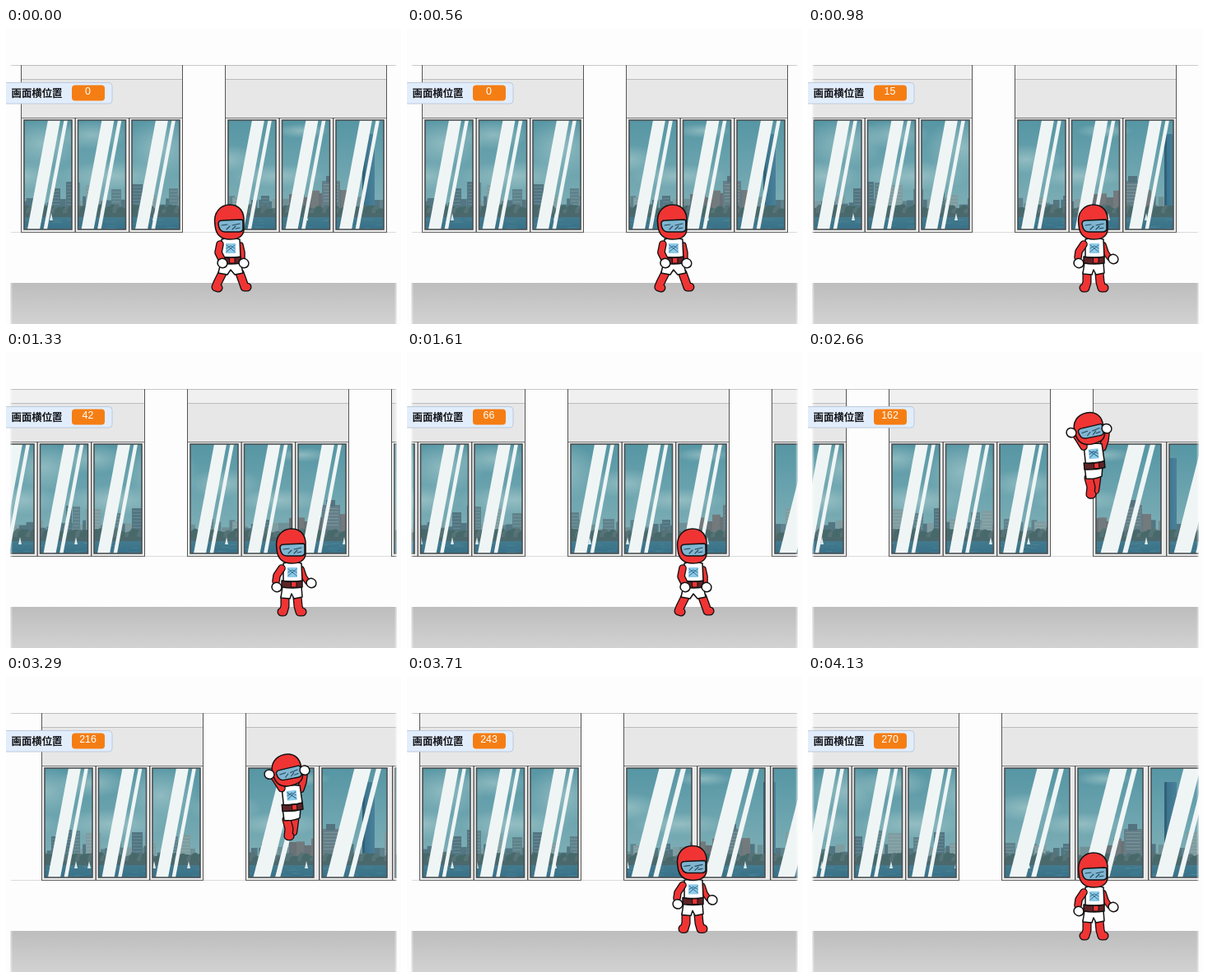
Animation, 480 px wide and 360 px high, one loop 4200 ms. Source, as an HTML page with a canvas:

```html
<!DOCTYPE html>
<html lang="ja">
<head>
<meta charset="utf-8">
<style>
html, body { margin: 0; width: 100%; height: 100%; overflow: hidden; background: #fdfdfd; }
canvas { display: block; }
</style>
</head>
<body>
<canvas id="stage" width="480" height="360"></canvas>
<script>
const W = 480, H = 360, LOOP = 4200, STEP = 70;
const RED = '#f03434', WHITE = '#fff', INK = '#111';
const ctx = document.getElementById('stage').getContext('2d');

function box(c, fill, x, y, w, h) {
  c.fillStyle = fill;
  c.fillRect(x, y, w, h);
}

function poly(c, fill, pts) {
  c.beginPath();
  pts.forEach(p => c.lineTo(p[0], p[1]));
  c.closePath();
  c.fillStyle = fill;
  c.fill();
}

function fade(c, x0, y0, x1, y1, ...colors) {
  const g = c.createLinearGradient(x0, y0, x1, y1);
  colors.forEach((col, i) => g.addColorStop(i / (colors.length - 1), col));
  return g;
}

// The city behind the windows stays still while the wall slides past.
function makeCity() {
  const cv = document.createElement('canvas');
  cv.width = W;
  cv.height = H;
  const c = cv.getContext('2d');
  let seed = 7;
  const rnd = () => (seed = seed * 16807 % 2147483647) / 2147483647;

  box(c, fade(c, 0, 110, 0, 225, '#5595a3', '#6aa3ae', '#80afb6'), 0, 105, W, 145);
  for (const [x, y, rx, ry] of [
    [45, 140, 50, 30], [105, 130, 44, 18], [188, 145, 46, 36], [130, 180, 70, 18],
    [265, 160, 46, 18], [330, 180, 60, 14], [360, 125, 35, 9], [20, 180, 44, 18]]) {
    c.save();
    c.translate(x, y);
    c.scale(rx, ry);
    const g = c.createRadialGradient(0, 0, 0, 0, 0, 1);
    g.addColorStop(0, 'rgba(168,202,204,.65)');
    g.addColorStop(1, 'rgba(168,202,204,0)');
    box(c, g, -1, -1, 2, 2);
    c.restore();
  }

  const greys = ['#6e9097', '#5f838c', '#7f9da1', '#527682'];
  for (let x = 0; x < W; x += 5 + rnd() * 6)
    box(c, greys[rnd() * 4 | 0], x, 204 + rnd() * 12, 6 + rnd() * 7, 30);
  for (const [x, y, w, i] of [
    [55, 195, 11, 3], [73, 187, 7, 3], [81, 188, 9, 1], [97, 191, 18, 2], [128, 196, 12, 1],
    [153, 190, 13, 3], [172, 203, 10, 2], [198, 195, 11, 1], [211, 193, 13, 2],
    [238, 203, 14, 1], [275, 206, 14, 2], [310, 204, 10, 3], [460, 190, 14, 2]]) {
    box(c, greys[i], x, y, w, 32);
    for (let yy = y + 3; yy < 220; yy += 4) box(c, 'rgba(190,210,210,.2)', x + 1, yy, w - 2, 1);
  }
  for (let x = 344; x < 412; x += 9)
    box(c, x % 2 ? '#737a7d' : '#687277', x, 197 + rnd() * 9, 10, 32);
  box(c, '#647f88', 384, 186, 22, 40);
  box(c, '#53737f', 389, 180, 11, 8);
  for (let y = 190; y < 212; y += 4) box(c, '#7d959b', 386, y, 18, 1);
  box(c, fade(c, 433, 0, 448, 0, '#38708a', '#4a819a'), 433, 129, 15, 90);
  box(c, '#316078', 433, 129, 3, 90);

  for (let x = 0; x < W; x += 5) {
    c.fillStyle = x % 3 ? '#47696a' : '#577377';
    c.beginPath();
    c.ellipse(x, 224, 6, 4 + rnd() * 6, 0, 0, 7);
    c.fill();
  }
  box(c, '#4b686d', 0, 225, W, 6);
  box(c, fade(c, 0, 230, 0, 247, '#437a8d', '#356f88'), 0, 230, W, 18);
  for (let i = 0; i < 70; i++)
    box(c, 'rgba(105,155,170,.35)', rnd() * W, 232 + rnd() * 13, 5 + rnd() * 10, .7);
  for (const x of [17, 55, 85, 101, 180, 222, 268, 365, 411])
    poly(c, '#dce8e9', [[x, 225], [x + 2, 234], [x - 2, 234]]);
  return cv;
}
const city = makeCity();

function pane(x, w) {
  const y = 112, h = 133, k = w / 58;
  box(ctx, '#f2f2f2', x - 2, 110, w + 4, 137);
  ctx.save();
  ctx.beginPath();
  ctx.rect(x, y, w, h);
  ctx.clip();
  ctx.drawImage(city, 0, 0);
  const bar = (a, b, c, d) => poly(ctx, '#eff5f5',
    [[x + a * k, y], [x + b * k, y], [x + d * k, y + h], [x + c * k, y + h]]);
  bar(29, 44, 4, 19);
  bar(48.5, 53, 23.5, 28);
  ctx.restore();
  ctx.lineWidth = 1.6;
  ctx.strokeStyle = '#4a5052';
  ctx.strokeRect(x, y, w, h);
}

function facade(x, w, pitch, glass) {
  box(ctx, '#f0f0f0', x, 45, w, 18);
  box(ctx, '#e7e7e7', x, 62, w, 48);
  box(ctx, '#e9e9e9', x, 109, w, 139);
  box(ctx, '#bcbcbc', x, 45, w, 1);
  box(ctx, '#bcbcbc', x, 62, w, 1);
  box(ctx, '#777', x, 109, w, 1);
  for (let i = 0; i < 3; i++) {
    if (i) box(ctx, '#555', x + i * pitch, 109, 1.4, 139);
    pane(x + 4 + i * pitch, glass);
  }
  box(ctx, '#666', x, 248, w, 1);
  box(ctx, '#555', x, 45, 1, 203);
  box(ctx, '#555', x + w - 1, 45, 1, 203);
}

function scene(shift) {
  box(ctx, '#fdfdfd', 0, 0, W, H);
  box(ctx, '#c9c9c9', 5, 45, 470, 1);
  box(ctx, '#dadada', 5, 248, 470, 1);
  facade(18 - shift, 197, 65.5, 58);
  facade(266 - shift, 197, 65.5, 58);
  facade(514 - shift, 268, 89, 79);
  box(ctx, fade(ctx, 0, 310, 0, 360, '#bdbdbd', '#d2d2d2'), 0, 310, W, 50);
  box(ctx, '#fdfdfd', 0, 0, 5, H);
  box(ctx, '#fdfdfd', 475, 0, 5, H);
  box(ctx, fade(ctx, 5, 0, 8, 0, 'rgba(253,253,253,.7)', 'rgba(253,253,253,0)'), 5, 0, 3, H);
  box(ctx, fade(ctx, 472, 0, 475, 0, 'rgba(253,253,253,0)', 'rgba(253,253,253,.7)'), 472, 0, 3, H);
}

function shape(path, fill, line = 1.5) {
  const p = new Path2D(path);
  ctx.fillStyle = fill;
  ctx.fill(p);
  ctx.lineWidth = line;
  ctx.strokeStyle = INK;
  ctx.stroke(p);
}

function limb(path, width) {
  const p = new Path2D(path);
  for (const [color, w] of [[INK, width + 2.6], [RED, width]]) {
    ctx.strokeStyle = color;
    ctx.lineWidth = w;
    ctx.stroke(p);
  }
}

function glove(x, y) {
  ctx.beginPath();
  ctx.ellipse(x, y, 6, 5.6, .4, 0, 7);
  ctx.fillStyle = WHITE;
  ctx.fill();
  ctx.lineWidth = 1.5;
  ctx.strokeStyle = INK;
  ctx.stroke();
}

function helmet() {
  shape('M-17 4C-20 -13 -9 -21 1 -21C13 -21 19 -12 18 0L18 10C17 18 10 21 1 21C-9 21 -16 16 -17 4Z', RED);
  shape('M-13 2Q-13 -2 -8 -2L15 -3Q17 -3 17 0L17 9Q16 12 12 12L-5 12Q-12 12 -13 2Z', '#7fb6d2', 1.5);
  ctx.lineWidth = 1.1;
  ctx.strokeStyle = '#27485a';
  ctx.stroke(new Path2D('M-9 4L-2 3M4 4L13 2M-3 9L1 5M4 9L8 5M8 8L13 7'));
}

function trunk() {
  shape('M-9 21Q2 18 13 21L14 43L-9 43Z', WHITE);
  box(ctx, '#8ccbe8', -4, 26, 12, 12);
  ctx.lineWidth = 1;
  ctx.strokeStyle = '#356a8c';
  ctx.stroke(new Path2D('M-3 28L7 36M7 28L-3 36M-3 32L2 29L7 32'));
}

function belt() {
  shape('M-11 42Q2 45 14 42L14 50Q2 52 -11 50Z', '#5e2428');
  shape('M1 43.5L7 43.5L7 50L1 50Z', RED, 1);
}

const walkPoses = [
  {
    legs: ['M-8 62L-14 74L-16 79L-13 80', 'M13 62L17 73L19 79L22 79'],
    pants: 'M-10 49L14 49L17 62L7 64L2 58L-2 64L-13 62Z',
    arms: ['M-11 27L-13 37L-9 45', 'M14 28L16 37L16 44'],
    hands: [[-8, 50], [18, 50]]
  },
  {
    legs: ['M-7 62L-7 73L-9 80L-11 80', 'M8 62L9 73L11 80L14 80'],
    pants: 'M-10 49L13 49L14 62L4 64L1 58L-1 64L-12 63Z',
    arms: ['M-11 27L-17 36L-18 43', 'M13 28L16 37L20 43'],
    hands: [[-17, 50], [25, 45]]
  }
];

function walker(pose) {
  pose.legs.forEach(l => limb(l, 8.5));
  limb(pose.arms[1], 5);
  shape(pose.pants, WHITE);
  trunk();
  belt();
  limb(pose.arms[0], 7);
  pose.hands.forEach(h => glove(...h));
  helmet();
}

function flyer() {
  limb('M10 62L9 70L8 77', 8);
  limb('M0 62L3 73L2 82L4 82', 8.5);
  shape('M-5 48L17 47L16 60Q8 64 -3 63Z', WHITE);
  limb('M17 25L20 16L21 8', 7);
  ctx.save();
  ctx.translate(1, 1);
  ctx.rotate(-.1);
  trunk();
  belt();
  ctx.restore();
  limb('M-6 24L-11 16L-15 10', 7);
  ctx.save();
  ctx.translate(0, 2);
  ctx.rotate(-.19);
  ctx.scale(1, .92);
  helmet();
  ctx.restore();
  glove(-21, 7);
  glove(22, 2);
}

function hero(t) {
  const u = (t - 2900) / 833;
  const lift = Math.max(0, 158 * (1 - u * u));
  const flying = lift > 20;
  ctx.save();
  ctx.lineCap = ctx.lineJoin = 'round';
  ctx.translate(271 + Math.min(75, t * .0908) - (flying ? 5 : 0), 236 - lift);
  if (flying) flyer();
  else walker(walkPoses[Math.floor(t / 190) % 2]);
  ctx.restore();
}

function monitor(value) {
  ctx.beginPath();
  ctx.roundRect(-6, 66.5, 135, 25.5, 4);
  ctx.fillStyle = '#e2edfc';
  ctx.fill();
  ctx.lineWidth = 1;
  ctx.strokeStyle = '#bccbdc';
  ctx.stroke();
  ctx.fillStyle = '#101216';
  ctx.textAlign = 'left';
  ctx.font = 'bold 12.4px "Noto Sans CJK JP", "Noto Sans CJK", sans-serif';
  ctx.fillText('画面横位置', 6.5, 84);
  ctx.beginPath();
  ctx.roundRect(80, 69.5, 40, 19, 4);
  ctx.fillStyle = '#f57e14';
  ctx.fill();
  ctx.fillStyle = WHITE;
  ctx.textAlign = 'center';
  ctx.font = '12.4px "Liberation Sans", Arial, sans-serif';
  ctx.fillText(value, 99.5, 81);
}

// Scroll distance by time: [ms, px]
const scroll = [[0, 0], [810, 0], [980, 15.6], [1610, 71], [2100, 115], [2660, 168],
  [3290, 223.5], [4130, 279.5], [4200, 284]];

function shiftAt(t) {
  const i = scroll.findIndex(k => k[0] > t);
  const [t0, a] = scroll[i - 1], [t1, b] = scroll[i];
  return a + (b - a) * (t - t0) / (t1 - t0);
}

function draw() {
  const t = Math.floor(performance.now() % LOOP / STEP) * STEP;
  const shift = shiftAt(t);
  scene(Math.floor(shift));
  hero(t);
  monitor(3 * Math.floor(shift / 3.1));
  requestAnimationFrame(draw);
}
draw();
</script>
</body>
</html>
```
